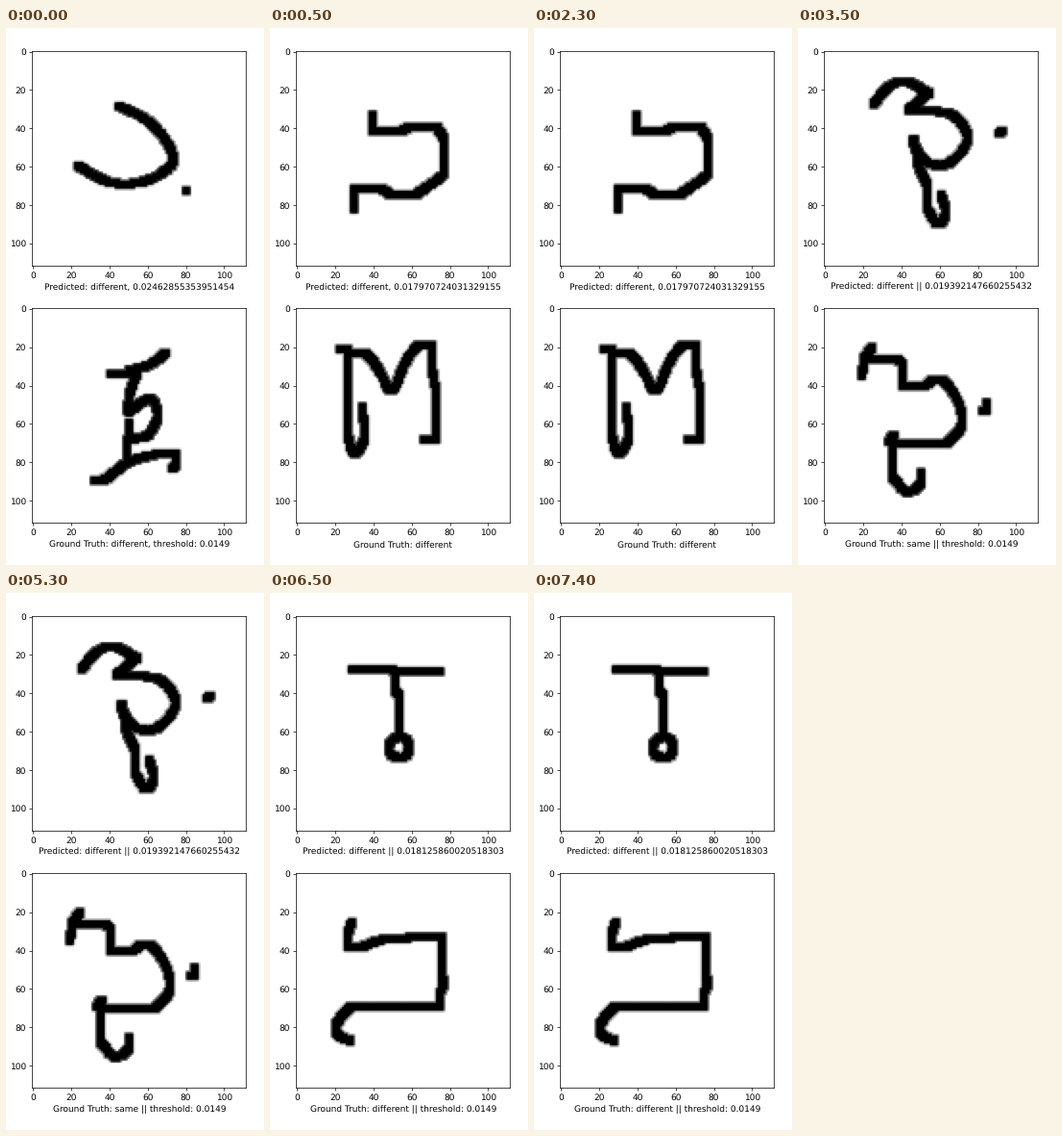
Animation of 269 by 558 pixels, one loop 8 s. Source, as a matplotlib script:

```python
import numpy as np
import matplotlib.pyplot as plt
from matplotlib.animation import FuncAnimation

W, H, DPI = 269, 558, 64
N = 112                    # glyph image size
GRID = N / 105             # step the pen snaps to
PEN_CORE, PEN_FADE = 1.8, 1.2
STEP_MS, STEPS = 500, 16
STARTS = (0, 1, 7, 13)     # step at which each pair appears

plt.rcParams.update({"font.family": "DejaVu Sans", "font.size": 10.1,
                     "text.hinting": "none"})


def line(*keys):
    """Straight segments through the key points."""
    pts = np.array(keys, float)
    t = np.linspace(0, len(pts) - 1, 60 * (len(pts) - 1) + 1)
    k = np.arange(len(pts))
    return np.column_stack([np.interp(t, k, pts[:, i]) for i in (0, 1)])


def curve(*keys):
    """Catmull-Rom spline through the key points."""
    p = np.array([keys[0], *keys, keys[-1]], float)
    t = np.linspace(0, 1, 40)[:, None]
    parts = []
    for a, b, c, d in zip(p, p[1:], p[2:], p[3:]):
        parts.append(b + (c - a) * t / 2
                     + (2 * a - 5 * b + 4 * c - d) * t**2 / 2
                     + (3 * b - a - 3 * c + d) * t**3 / 2)
    return np.vstack(parts)


def ring(x, y, r):
    a = np.linspace(0, 2 * np.pi, 80)
    return np.column_stack([x + r * np.cos(a), y + r * np.sin(a)])


def glyph(*strokes):
    """Stamp a soft, slightly rounded pen along every stroke."""
    yy, xx = np.mgrid[:N, :N]
    img = np.ones((N, N))
    cells = np.unique(np.round(np.vstack(strokes) / GRID), axis=0)
    for x, y in cells * GRID:
        dist = ((xx - x)**6 + (yy - y)**6) ** (1 / 6)
        img = np.minimum(img, np.clip((dist - PEN_CORE) / PEN_FADE, 0, 1))
    return img


hook_dot = glyph(
    curve((45, 28.5), (62, 38), (73.3, 56), (60, 67), (41, 68.3), (23.3, 59.5)),
    line((79.7, 72.6), (79.7, 72.6)))
tall_knot = glyph(
    line((40.3, 34), (52, 34)),
    curve((50, 32.5), (61, 29.5), (69.3, 23.5)),
    curve((54, 35), (50.5, 44), (49.3, 53)),
    curve((50, 54), (61, 47), (65, 56), (60, 66), (50, 68)),
    line((50, 60), (49, 80)),
    curve((32.5, 89.5), (38.5, 88.5), (50, 80), (66, 75.8), (74, 75.5)),
    line((74, 75.5), (75, 81), (73, 83)))
open_box = glyph(
    line((39.2, 33), (39.2, 41.7), (54, 41.7), (59, 39.3), (73, 39.3),
         (77, 46), (77, 64), (62, 74.7), (49, 74.7), (44, 71.5),
         (29.8, 71.5), (29.8, 82)))
big_m = glyph(
    line((22.6, 21.3), (27, 21.3), (27, 68)),
    curve((27, 68), (30, 75.3), (35, 68), (34, 51)),
    curve((28, 23.5), (36, 24), (43, 32.5), (49.5, 43), (56, 29.5),
          (63, 19.8), (70, 19.3)),
    line((70, 19.3), (70, 28), (72, 40), (72, 68.3), (65.8, 68.3)))
swan = glyph(
    curve((25.5, 27.5), (34, 18), (43, 16), (54, 22)),
    line((54, 21.5), (44, 30.5)),
    curve((44, 31), (66, 33), (74.5, 46), (64, 58.5), (52, 57), (45.5, 46)),
    line((47, 46), (48, 58), (53, 69), (53.5, 82)),
    curve((53.5, 82), (59, 90), (63, 84), (60.5, 74.5)),
    line((91, 43), (92.3, 41.7)))
step_bow = glyph(
    line((24.3, 20.5), (20.5, 26), (19.2, 35.5)),
    line((21, 26.5), (38, 26.5), (40.8, 29), (40.8, 40.7), (52, 40.7), (55, 38)),
    curve((55, 38), (62, 38), (70, 50), (71, 62), (63.5, 70)),
    line((63.5, 70), (35.3, 70), (35.3, 88)),
    curve((35.3, 88), (43, 95.5), (50, 91), (50, 85)),
    line((36, 66), (33, 69.5)),
    line((82.3, 53.5), (84.6, 53.5), (84.6, 49)))
key = glyph(
    line((28.5, 27.7), (50, 27.7)),
    line((50, 28.8), (75, 28.8)),
    line((51, 28.8), (51, 38), (53, 41), (53.5, 62)),
    ring(53.3, 68.3, 5.4))
flag = glyph(
    line((28.5, 26), (27, 30), (27, 38.5), (33, 38.5), (46, 34), (75.5, 33),
         (75.5, 53), (77, 57), (74.5, 63), (74.5, 69), (29, 69)),
    curve((29, 69), (23, 75), (19.8, 81), (22.5, 85), (28, 87)))

SCENES = [
    ((hook_dot, "Predicted: different, 0.02462855353951454"),
     (tall_knot, "Ground Truth: different, threshold: 0.0149")),
    ((open_box, "Predicted: different, 0.017970724031329155"),
     (big_m, "Ground Truth: different")),
    ((swan, "Predicted: different || 0.019392147660255432"),
     (step_bow, "Ground Truth: same || threshold: 0.0149")),
    ((key, "Predicted: different || 0.018125860020518303"),
     (flag, "Ground Truth: different || threshold: 0.0149")),
]


def panel(top):
    left, size = 27.2, 223.2
    ax = fig.add_axes([left / W, 1 - (top + size) / H, size / W, size / H])
    im = ax.imshow(np.ones((N, N)), cmap="gray", vmin=0, vmax=1)
    ax.set_xticks(range(0, 101, 20))
    ax.set_yticks(range(0, 101, 20))
    return ax, im


fig = plt.figure(figsize=(W / DPI, H / DPI), dpi=DPI, facecolor="white")
panels = [panel(23.55), panel(290.9)]


def draw(step):
    scene = SCENES[sum(step >= s for s in STARTS) - 1]
    for (ax, im), (img, label) in zip(panels, scene):
        im.set_data(img)
        ax.set_xlabel(label)
    return [im for _, im in panels]


anim = FuncAnimation(fig, draw, frames=STEPS, interval=STEP_MS, repeat=True,
                     repeat_delay=0, blit=False)
plt.show()
```
